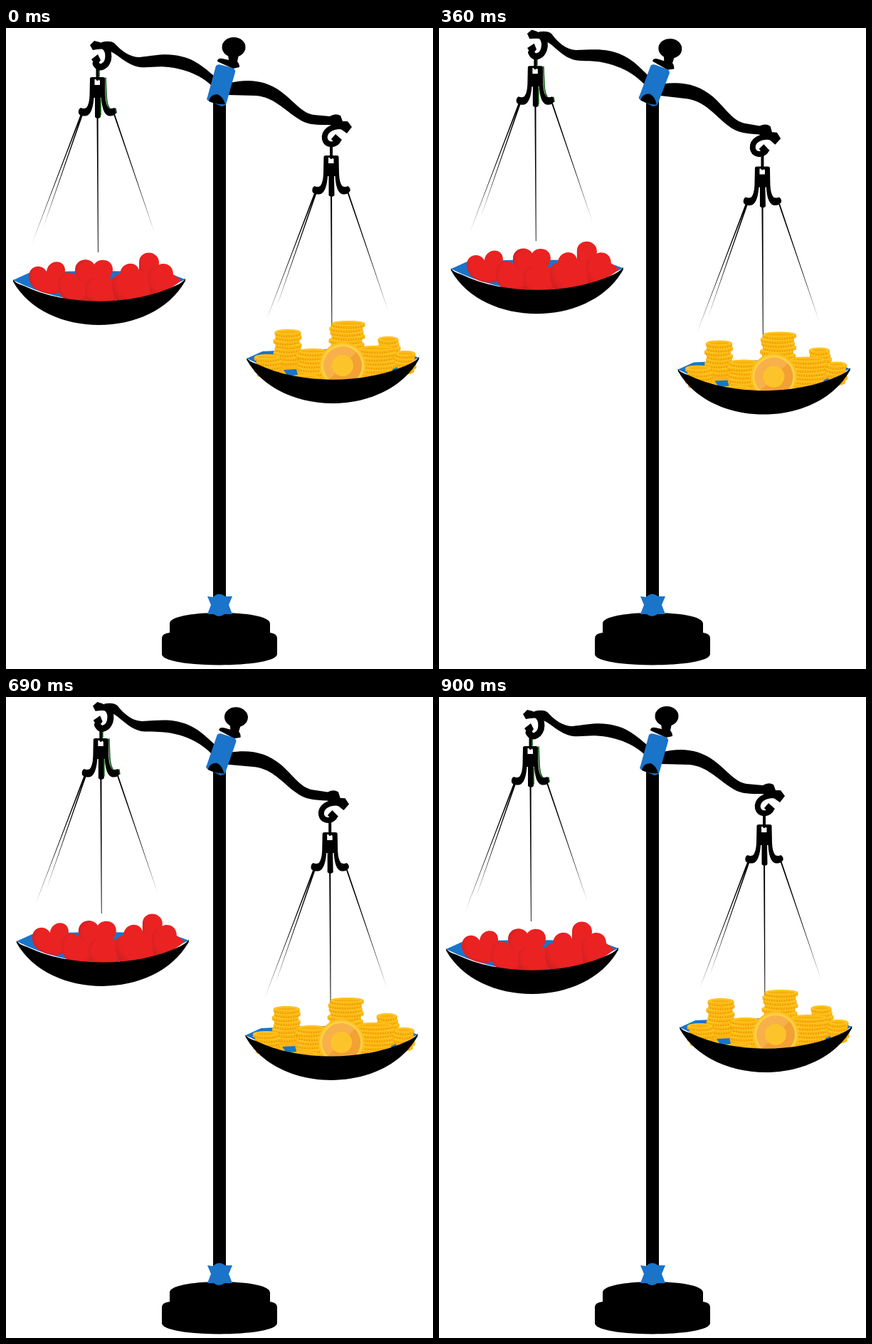
Animation, 600 px wide and 900 px high, one loop 0.93 s. Source, as an HTML page:

```html
<!DOCTYPE html>
<html lang="en">
<head>
<meta charset="utf-8">
<title>Balance scale</title>
<style>
  html, body { margin: 0; width: 100%; height: 100%; overflow: hidden; background: #fff; }
  svg { display: block; width: 600px; height: 900px; }
  .blue { fill: #1a74c9; }
  .line { fill: none; stroke: #000; stroke-linecap: round; stroke-linejoin: round; }
</style>
</head>
<body>
<svg viewBox="0 0 600 900">
  <defs>
    <radialGradient id="red" cx=".58" cy=".45" r=".66">
      <stop offset=".7" stop-color="#ea2222"/>
      <stop offset="1" stop-color="#cf2020"/>
    </radialGradient>
    <linearGradient id="disc" x1="0" y1="0" x2="1" y2="1">
      <stop offset=".5" stop-color="#f7b04a"/>
      <stop offset=".5" stop-color="#f3a035"/>
    </linearGradient>
    <g id="hanger">
      <path d="M104.500 122 L37 301 L106.500 122Z M106 122 L52 281 L108 122Z M127.500 124 L129 315 L129.800 315 L129.600 124Z M151 121 L208.500 287 L153 121Z"/>
      <path class="line" stroke-width="4" d="M128.500 54V72"/>
      <path fill-rule="evenodd" d="M118 71 Q118 69 121 69 H136 Q139 69 139 71 L139.500 95 Q140 107 144 112 Q148 114 152 112 Q156 115 155 119 Q151 125 143 123 Q135 119 134 98 L132.500 98 L133 125 Q129 129 125 125 L125 98 L123.500 98 Q122 119 114 123 Q105 125 102 120 Q101 114 105 112 Q109 114 113 112 Q117 107 117.500 95Z M124.500 72 V80 H132 V74 L130 72Z"/>
    </g>
    <path id="bowl" class="blue" d="M10 354 L32 344 Q131 338 228 344 L252 353 Q131 414 10 354Z"/>
    <path id="pan" d="M10 353 Q12 358 25 362 C85 391 178 391 240 361 Q250 356 252 351.500 V355 C206 437.500 56 437.500 10 356Z"/>
  </defs>

  <path d="M291 95H309V805H291Z"/>
  <path d="M230 836 C230 816 371 816 371 836 V849 Q381 850 381 857 V879 C381 899.500 219 899.500 219 879 V857 Q219 850 230 849Z"/>
  <path class="blue" d="M283 798 L291 799 Q299 791 308 798 L318 798 L313 810 L318 823 L307 823 Q299 829 292 823 L283 823 L288 810Z"/>

  <g id="left">
    <use href="#hanger"/>
    <path class="line" stroke="#075c0a" style="stroke:#075c0a" stroke-width="1.600" d="M131 56V68 M140 70 L141 96 Q142 108 145 112 M133 99V122 M154 113 L155 119"/>
    <use href="#bowl"/>
    <g fill="url(#red)">
      <path d="M187 329 C187 311 214 311 215 329 C215 337 211 342 204 348 L187 344Z"/>
      <path d="M97 340 C97 323 118 321 124 332 C130 322 150 324 150 339 C150 350 140 357 130 364 L105 357 C99 351 97 346 97 340Z"/>
      <path d="M32 351 C31 333 50 330 57 342 C59 324 83 324 83 340 C83 353 80 363 74 372 C62 376 35 371 32 351Z"/>
      <path d="M73 361 C73 341 94 337 103 354 L114 358 V384 H87 C78 379 73 371 73 361Z"/>
      <path d="M111 368 C111 351 125 347 134 354 L152 351 L154 386 H117 Q111 378 111 368Z"/>
      <path d="M149 361 C149 348 158 345 160 346 C161 328 183 326 187 340 L201 343 L206 384 H156 Q149 374 149 361Z"/>
      <path d="M200 353 C199 340 208 335 210 337 C214 328 235 328 235 346 L246 354 Q235 366 203 377Z"/>
    </g>
    <use href="#pan"/>
  </g>

  <g id="right">
    <use href="#hanger" x="328.500" y="110"/>
    <use href="#bowl" x="328.300" y="110"/>
    <g id="coins"></g>
    <path class="blue" d="M390 480 L408 479 L410 487 L396 489Z M543 479 L550 476 V483 H543Z"/>
    <circle cx="473" cy="474" r="32.500" fill="#fbc02b"/>
    <circle cx="473" cy="474" r="30" fill="#fdd23e"/>
    <circle cx="473" cy="474" r="27" fill="url(#disc)"/>
    <circle cx="473" cy="474" r="15" fill="#fcc42a"/>
    <use href="#pan" x="328.300" y="110"/>
  </g>

  <g id="beam">
    <path d="M134 20 Q146 17 152 21 C163 33 174 41 188 41 C207 39 220 36 236 38 C261 41 274 52 292 67 L315 77 C342 71 365 74 386 89 C405 103 416 120 433 122 L455 124 Q463 119 470 123 L473 131 L480 131 L486 139 L479 148 L472 143 L455 136 C438 136 424 137 410 127 C390 114 376 97 351 95 L312 94 L288 80 C272 66 253 58 229 55 C212 53 203 56 188 55 C168 51 160 39 147 33Z"/>
    <path class="line" stroke-width="9" d="M127 25 L136 25 C147 30 146 50 136 54 Q130 57 126 50"/>
    <path d="M118 24 L124 18 L132 20 L134 29 L122 31Z M120 44 L129 37 L133 45 L127 54Z"/>
    <path class="line" stroke-width="8" d="M473 138 C456 137 446 146 448 156 C450 164 460 166 466 159"/>
    <path d="M457 156 L463 149 L472 157 L465 165Z"/>
    <ellipse cx="320" cy="27" rx="16.500" ry="14"/>
    <path d="M312 38 H327 L325 47 Q328 50 328 55 L319 57 L297 47 Q297 42 304 43 L313 45Z"/>
    <path class="blue" d="M295 53 Q298 50 303 52 L318 56 Q323 58 322 62 L309 108 L303 110 L284 102 Q281 100 283 97Z"/>
    <path d="M285 103 Q287 93 297 93 Q305 96 308 107 Q296 108 285 103Z"/>
  </g>
</svg>
<script>
  const el = id => document.getElementById(id);

  // Coin piles: centre x, top y, radius, number of coins
  const piles = [
    [396, 427, 18, 8], [538, 437, 14, 6], [479, 415, 23, 10], [560, 457, 14, 5],
    [369, 462, 18, 5], [430, 454, 20, 7], [521, 450, 25, 8], [420, 490, 22, 2]
  ];
  const coin = (x, y, r) => {
    const edge = `M${x - r} ${y} v4 q${r} 6 ${2 * r} 0 v-4Z`;
    const ticks = `M${x - r + 2} ${y + 4} q${r - 2} 4 ${2 * r - 4} 0`;
    return `<path d="${edge}" fill="#ffb90f" stroke="#f3a20c" stroke-width=".8"/>` +
      `<path d="${ticks}" fill="none" stroke="#e8950a" stroke-width="3" stroke-dasharray="1 2.500"/>` +
      `<ellipse cx="${x}" cy="${y}" rx="${r}" ry="3.500" fill="#ffc926" stroke="#ffb90f"/>`;
  };
  const pile = ([x, y, r, n]) => {
    let out = '';
    for (let i = n - 1; i >= 0; i--) out += coin(x + Math.round(2 * Math.sin(i * 2.3 + x)), y + i * 5.6, r);
    return out + `<ellipse cx="${x + Math.round(2 * Math.sin(x))}" cy="${y}" rx="${r - 4}" ry="1.800" fill="#f9b010"/>`;
  };
  el('coins').innerHTML =
    '<path d="M352 469 L380 459 H555 L575 467 Q458 525 352 469Z" fill="#fdb515"/>' +
    piles.map(pile).join('');

  const STEP = 30, LOOP = 930;
  function draw(now) {
    const s = Math.sin(Math.PI * Math.floor(now % LOOP / STEP) / 30);
    el('beam').setAttribute('transform', `rotate(${5.4 * s} 301 82)`);
    el('left').setAttribute('transform', `translate(${7.2 * s} ${-16.6 * s})`);
    el('right').setAttribute('transform', `translate(${-2.7 * s} ${16.4 * s})`);
  }
  const start = performance.now();
  function tick() {
    draw(performance.now() - start);
    requestAnimationFrame(tick);
  }
  tick();
</script>
</body>
</html>
```
